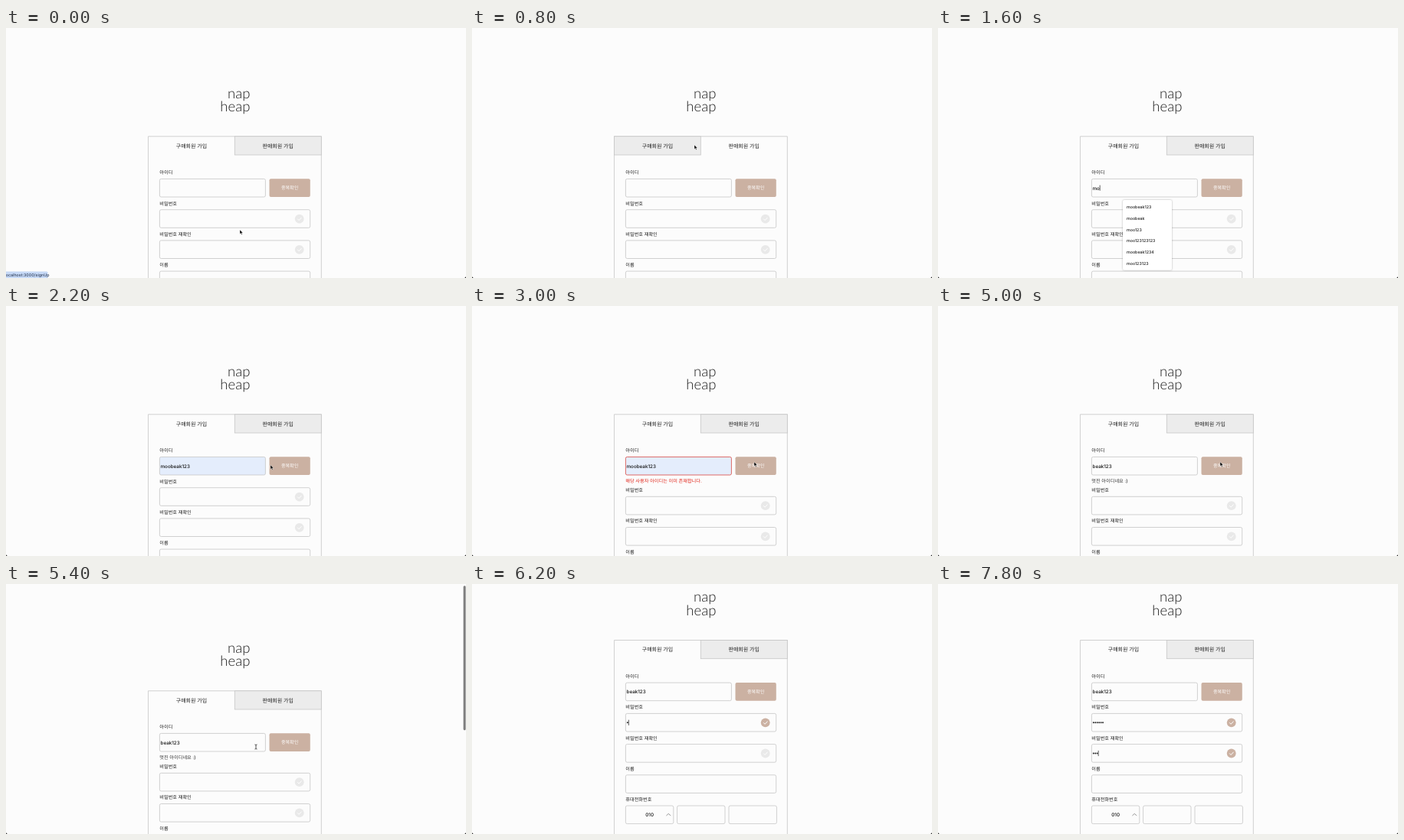
Animation, 600 px wide and 327 px high, one loop 8000 ms. Source, as an HTML page:

```html
<!DOCTYPE html>
<html lang="ko">
<head>
<meta charset="utf-8">
<title>회원 가입</title>
<style>
  html, body { margin: 0; width: 100%; height: 100%; overflow: hidden; background: #fcfcfc; }
  svg { display: block; width: 100%; height: 100%; }
  text { font-family: Inter, 'Noto Sans CJK KR', 'Noto Sans CJK', sans-serif; font-weight: 500; text-rendering: geometricPrecision; }
  .logo { font-family: Lato, sans-serif; font-weight: 300; }
  .menu { filter: drop-shadow(0 .8px 1.2px rgba(0, 0, 0, .3)); }
</style>
</head>
<body>
<svg id="stage" viewBox="0 0 600 327"></svg>
<script>
const LOOP = 8000, STEP = 200;
const LINE = '#c6c6c6', INK = '#1c1c1c', TAN = '#cbb1a2', RED = '#d8463f', PALE = '#ececec';
const USER = 'moobeak123', SHORT_USER = 'beak123';
const MENU_ALL = [USER, 'moobeak', 'moo123', 'moo123123123', 'moobeak1234', 'moo123123'];
const MENU_MATCH = [USER, 'moobeak1234', 'moobeak12345', 'moobeak123456'];

// Pointer stops: time, x, y, shape
const POINTER = [
  [0, 305, 264, 'arrow'], [200, 325, 230, 'arrow'], [400, 350, 160, 'arrow'], [600, 350, 154, 'arrow'],
  [800, 290, 153, 'arrow'], [1000, 250, 154, 'arrow'], [1200, 235, 209, 'beam'], [1400, 0, 0, ''],
  [1800, 258, 236, 'arrow'], [2000, 258, 234, 'arrow'], [2200, 345, 208, 'arrow'], [2400, 368, 204, 'arrow'],
  [3200, 340, 208, 'beam'], [3400, 260, 209, 'beam'], [3600, 214, 209, 'beam'], [4000, 200, 209, 'beam'],
  [4200, 185.5, 209, 'arrow'], [4400, 0, 0, ''], [4800, 358, 208, 'arrow'], [5000, 368, 204, 'arrow'],
  [5200, 335, 211, 'beam'], [5400, 326, 213, 'beam'], [6000, 300, 186, 'beam'], [6200, 0, 0, '']
];
const SCROLL = [[0, 0], [5400, 2], [5600, 24], [5800, 56], [6000, 68.3]];

const latest = (list, t) => list.filter(item => item[0] <= t).pop();
const during = (t, from, to) => t >= from && t < to;

const box = (x, y, w, h, fill = 'none', stroke = 'none', r = 0) =>
  `<rect x="${x}" y="${y}" width="${w}" height="${h}" rx="${r}" fill="${fill}" stroke="${stroke}" stroke-width=".8"/>`;
const path = (d, stroke, width = .8, fill = 'none') =>
  `<path d="${d}" fill="${fill}" stroke="${stroke}" stroke-width="${width}"/>`;
// Text centred vertically on y
const text = (x, y, str, size = 6.2, fill = INK, anchor = 'start') =>
  `<text x="${x}" y="${y + size * .36}" font-size="${size}" fill="${fill}" text-anchor="${anchor}">${str}</text>`;
const field = (x, y, w, fill = '#fcfcfc', stroke = LINE) => box(x, y, w, 23.6, fill, stroke, 2);
const caret = (x, y) => path(`M${x} ${y - 3.6}v7.2`, INK, .7);

function logo() {
  return ['nap', 'heap'].map((word, i) =>
    `<text class="logo" x="318.5" y="${91.8 + i * 17.6}" font-size="18.6" fill="${INK}" text-anchor="end">${word}</text>`).join('');
}

function tabs(active) {
  const left = 185.5, mid = 298.3, right = 411.3, top = 141.8, bottom = 166;
  const idle = active ? box(left, top, mid - left, bottom - top, PALE, LINE)
                      : box(mid, top, right - mid, bottom - top, PALE, LINE);
  return path(`M${left} 450V${top}H${right}V450`, LINE) + idle +
    text(242, 154, '구매회원 가입', 7, INK, 'middle') + text(354.7, 154, '판매회원 가입', 7, INK, 'middle');
}

function password(y, count, focused) {
  const mid = y + 11.9;
  let out = field(200.4, y, 196.3) +
    `<circle cx="382.7" cy="${mid}" r="5.9" fill="${count ? TAN : '#e9e9e9'}"/>` +
    path(`M380.1 ${mid}l2 2 3.4-3.7`, '#fff', 1);
  for (let i = 0; i < count; i++)
    out += `<circle cx="${202.8 + i * 2.45}" cy="${mid}" r=".95" fill="${INK}"/>`;
  return out + (focused ? caret(202 + count * 2.4, mid) : '');
}

function idRow(t, failed) {
  const value = t < 1400 ? '' : t < 1600 ? 'm' : t < 2000 ? 'mo' : t < 4400 ? USER : SHORT_USER;
  const filled = during(t, 2000, 4400);
  return text(200.3, 189, '아이디') +
    field(200.4, 197.4, 138, filled ? '#e4edfc' : '#fcfcfc', failed ? RED : LINE) +
    (during(t, 4000, 4400) ? box(201.5, 205.2, 12.6, 8, '#9dbdee') : '') +
    text(201.5, 209.3, value, 6.3, '#111') +
    (t === 1200 ? caret(202, 209.2) : t === 1400 ? caret(207.4, 209.2) : during(t, 1600, 2000) ? caret(211.2, 209.2) : '') +
    box(343.5, 197.2, 53.3, 23.9, TAN, 'none', 2) +
    text(370.1, 209.2, '중복확인', 6.1, '#fff', 'middle');
}

function lowerRows(t) {
  const first = t < 6200 ? 0 : Math.min(6, 1 + (t - 6200) / 100);
  const second = t < 7400 ? 0 : (t - 7200) / STEP;
  return text(200.3, 229.4, '비밀번호') + password(237.7, first, during(t, 6000, 7200)) +
    text(200.3, 269.6, '비밀번호 재확인') + password(277.9, second, t >= 7200) +
    text(200.3, 309.8, '이름') + field(200.4, 318.1, 196.3) +
    text(200.3, 350, '휴대전화번호') +
    [200.4, 267.6, 335].map(x => field(x, 358.3, 62.4)).join('') +
    text(231.6, 370.2, '010', 6.3, INK, 'middle') + path('M253.4 371.3l2.9-2.6 2.9 2.6', '#8a8a8a', .9);
}

function menu(items) {
  return `<g class="menu">${box(241, 225, 64, items.length * 14.8 + 3, '#fff', 'none', 2)}</g>` +
    items.map((item, i) => text(246, 234 + i * 14.8, item, 5.3)).join('');
}

function pointer(t) {
  const [, x, y, shape] = latest(POINTER, t);
  if (!shape) return '';
  return `<g transform="translate(${x} ${y})">` + (shape === 'arrow'
    ? path('M0 0V5.4L1.3 4.3 2.2 6.3 3.2 5.9 2.3 3.9H4Z', '#fff', .4, '#000')
    : path('M-1.5-3Q0-3 0-2.2Q0-3 1.5-3M0-2.2V2.2M-1.5 3Q0 3 0 2.2Q0 3 1.5 3', '#222')) + '</g>';
}

function scene(t) {
  const failed = during(t, 2400, 4600), passed = during(t, 5000, 6200);
  const scroll = latest(SCROLL, t)[1];
  return box(0, 0, 600, 327, '#fcfcfc') +
    `<g transform="translate(0 ${-scroll})">` + logo() + tabs(during(t, 600, 1000)) + idRow(t, failed) +
    (failed ? text(200.3, 229, '해당 사용자 아이디는 이미 존재합니다.', 6.2, '#e02318') : '') +
    (passed ? text(200.3, 229, '멋진 아이디네요 :)', 6.2, '#333') : '') +
    `<g transform="translate(0 ${failed || passed ? 11.6 : 0})">${lowerRows(t)}</g></g>` +
    (during(t, 1400, 2000) ? menu(MENU_ALL) : during(t, 3800, 4400) ? menu(MENU_MATCH) : '') +
    (during(t, 5400, 6200) ? box(596.6, 1 + scroll * .58, 3, 189, '#7d7d7d', 'none', 1.5) : '') +
    path('M0 325V327H2Q.4 326.6 0 325M600 325V327H598Q599.6 326.6 600 325', 'none', 0, '#111') +
    (t < 200 ? box(-2, 318.6, 56.5, 10, '#c6d9f6', 'none', 1.5) + text(-1.6, 323, 'localhost:3000/signUp', 5.3, '#33415c') : '') +
    pointer(t);
}

const stage = document.getElementById('stage');
let shown = -1;
function tick() {
  const t = Math.floor(performance.now() % LOOP / STEP) * STEP;
  if (t !== shown) stage.innerHTML = scene(shown = t);
  requestAnimationFrame(tick);
}
tick();
</script>
</body>
</html>
```
